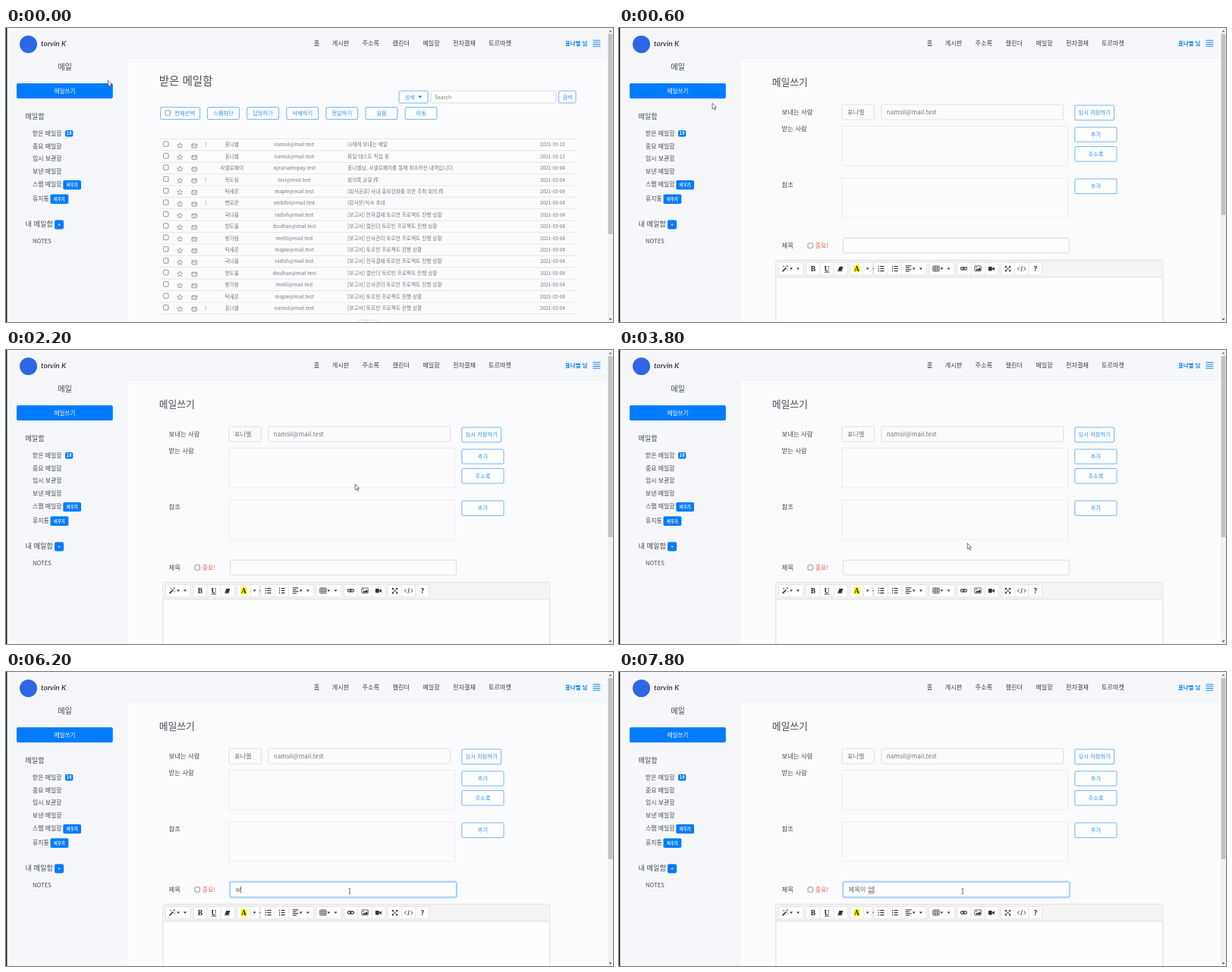
Recreate the animation shown at these times as an HTML page. Size 800x388 px, loop 8 s.

```html
<!DOCTYPE html>
<html lang="ko">
<head>
<meta charset="utf-8">
<style>
html, body { margin: 0; width: 100%; height: 100%; overflow: hidden; background: #fcfcfe; }
svg { display: block; width: 800px; height: 388px; }
text { font-family: "Noto Sans CJK KR", "Noto Sans CJK", "Noto Sans KR", "Noto Sans", sans-serif; white-space: pre; }
</style>
</head>
<body>
<svg id="stage" viewBox="0 0 800 388" xmlns="http://www.w3.org/2000/svg"></svg>
<script>
const BLUE = '#007bff', INK = '#45494f', SOFT = '#707479', TITLE = '#484b50', RED = '#ee5f57', PAGE = '#fcfcfe';
const EDGE = '#4f9ff4', LINK = '#2a8ffb';
const LOOP = 8000, STEP = 200, OPEN = 600, FOCUS = 5800;
const byId = id => document.getElementById(id);

function text(x, y, s, size, fill = INK, o = {}) {
  const { anchor = 'start', weight = 400, extra = '' } = o;
  return `<text x="${x}" y="${y}" font-size="${size}" fill="${fill}" text-anchor="${anchor}" font-weight="${weight}" ${extra}>${s}</text>`;
}
const mid = (x, y, s, size, fill, weight) => text(x, y, s, size, fill, { anchor: 'middle', weight });
// Rectangle given by its left, top, right and bottom edges
function box(l, t, r, b, fill = 'none', stroke = 'none', rx = 0, extra = '') {
  return `<rect x="${l}" y="${t}" width="${r - l}" height="${b - t}" fill="${fill}" stroke="${stroke}" stroke-width=".8" rx="${rx}" ${extra}/>`;
}
const path = (d, stroke, w = 0.8, fill = 'none') =>
  `<path d="${d}" stroke="${stroke}" stroke-width="${w}" fill="${fill}"/>`;
const shape = (d, fill = '#333') => path(d, 'none', 0, fill);
const button = (l, t, r, b, s, size = 7.2) =>
  box(l, t, r, b, '#fff', EDGE, 1.6) + mid((l + r) / 2, (t + b) / 2 + 2.6, s, size, LINK);
const check = (x, y) => box(x, y, x + 6.4, y + 6.4, '#fff', '#777', 1.2);
const badge = (l, t, r, b, s, size = 5.3) =>
  box(l, t, r, b, BLUE, 'none', 1.8) + mid((l + r) / 2, (t + b) / 2 + size * 0.36, s, size, '#fff', 700);
const caretDown = (x, y, w = 2) => shape(`M${x - w} ${y - w / 2}h${2 * w}l${-w} ${w * 1.15}z`);

function frame() {
  let s = box(0, 0, 800, 388, PAGE) + box(0, 0, 793, 41, '#f5f7fa') + box(0, 41, 160, 388, '#f5f7fa');
  s += box(0, 0, 1.4, 388, '#15171a');
  s += '<circle cx="29.5" cy="21.5" r="11.5" fill="#2f66e6"/>';
  s += text(46, 24.3, 'torvin K', 10, '#222', { weight: 500, extra: 'font-style="italic" style="font-family:Lato,sans-serif"' });

  const nav = [['홈', 409.5], ['게시판', 441], ['주소록', 480.7], ['캘린더', 520.7], ['메일함', 560.5], ['전자결재', 604], ['토르마켓', 651]];
  for (const [label, x] of nav) s += mid(x, 23, label, 8.1, '#3a3d42');
  s += text(737, 22.8, '표나별 님', 7.4, BLUE, { weight: 700 });
  for (let i = 0; i < 4; i++) s += path(`M773.5 ${16.3 + i * 2.6}h9.8`, BLUE, 0.9);

  s += mid(77.5, 55.3, '메일', 10.2, INK);
  s += box(14, 73, 140.8, 93, BLUE, 'none', 2, 'id="write"') + mid(77.5, 85.8, '메일쓰기', 7.5, '#fff');
  s += text(25.5, 120.3, '메일함', 9.1);
  [['받은 메일함', 142], ['중요 메일함', 158.5], ['임시 보관함', 175.2], ['보낸 메일함', 192], ['스팸 메일함', 209.4], ['휴지통', 228]]
    .forEach(([label, y]) => s += text(35, y, label, 7.9));
  s += badge(78, 135, 88.3, 143.6, '18', 6) + badge(75.3, 201, 99, 213.3, '비우기') + badge(58.5, 219.5, 82.3, 232, '비우기');
  s += text(25.5, 262, '내 메일함', 9.2) + badge(64, 253.6, 76, 265.4, '+', 6);
  s += text(35, 284, 'NOTES', 7.7);

  s += box(793, 0, 800, 388, '#f1f1f1') + box(793.7, 8, 799.4, 272, '#c1c1c1', 'none', 0, 'id="thumb"');
  s += shape('M794.6 5.2h4l-2-2.4z', '#777') + shape('M794.6 383.4h4l-2 2.4z', '#444');
  return s;
}

function inbox() {
  let s = text(201.7, 75.3, '받은 메일함', 14.5, TITLE, { weight: 300 });
  s += box(518, 83, 556, 99, '#fff', EDGE, 1.6) + text(526, 93.6, '상세', 7.2, LINK);
  s += shape('M543.3 89.6h5l-2.5 3z', BLUE);
  s += box(560, 83, 725, 99, '#fff', '#ced4da', 1.8) + text(564.8, 93.5, 'Search', 7, '#777');
  s += button(728.6, 83, 751, 99, '검색');
  s += box(203.6, 104.6, 255.6, 120.6, '#fff', EDGE, 1.6) + check(210, 108.8) + text(222, 115.2, '전체선택', 7.4, LINK);
  ['스팸차단', '답장하기', '삭제하기', '전달하기', '읽음', '이동'].forEach((label, i) =>
    s += button(265.6 + i * 52.1, 104.6, 307.4 + i * 52.1, 120.6, label, 7.3));

  const me = ['표나별', 'namsil@mail.test'], shop = ['사엘로페이', 'xyz@saelopay.test'], ok = ['옥도림', 'tovi@mail.test'];
  const tak = ['탁새온', 'maple@mail.test'], byun = ['변로운', 'webdol@mail.test'], kuk = ['국나울', 'radish@mail.test'];
  const bang = ['방도울', 'doulhan@mail.test'], bong = ['봉가람', 'mellll@mail.test'];
  const report = topic => `[보고서] ${topic}토르빈 프로젝트 진행 상황`;
  const rows = [
    [me, '나에게 보내는 메일'], [me, '파일 테스트 작업 중'],
    [shop, '표나별님, 사엘로페이를 통해 취소하신 내역입니다.'],
    [ok, '회의록 공유 件'], [tak, '[회식공유] 사내 홍보강화를 위한 주최 회의 件'], [byun, '(감사문)식사 초대'],
    [kuk, report('전자결재 ')], [bang, report('캘린더 ')], [bong, report('인사관리 ')], [tak, report('')],
    [kuk, report('전자결재 ')], [bang, report('캘린더 ')], [bong, report('인사관리 ')], [tak, report('')], [me, report('')]
  ];
  rows.forEach(([[name, mail], title], i) => {
    const y = 154 + i * 15.4, base = y + 2.4;
    s += path(`M202 ${y - 7.6}H752`, '#dfe2e6', 0.8);
    s += check(207.6, y - 4) + star(229, y + 1.3);
    s += box(245, y - 1, 251.4, y + 4, 'none', '#777', 0.6) + path(`M245 ${y - 0.6}l3.2 2.6l3.2 -2.6`, '#777', 0.7);
    if ([0, 3, 5, 14].includes(i)) s += mid(263.3, base + 0.5, '!', 7.6, RED, 500);
    s += mid(297.7, base, name, 6.75, SOFT) + mid(380, base, mail, 6.43, SOFT);
    s += text(450, base, title, 6.7, SOFT) + mid(720.4, base, i < 2 ? '2021-03-13' : '2021-03-04', 6.43, SOFT);
  });
  s += path('M202 377.4H752', '#dfe2e6', 0.8);
  return s + box(464, 385.5, 489, 400, '#fff', '#d5d9de', 1.5) + path('M476.5 385.5V388', '#d5d9de');
}

function star(cx, cy) {
  let d = '';
  for (let i = 0; i < 10; i++) {
    const a = i * Math.PI / 5, r = i % 2 ? 1.7 : 3.7;
    d += (i ? 'L' : 'M') + (cx + r * Math.sin(a)).toFixed(2) + ' ' + (cy - r * Math.cos(a)).toFixed(2);
  }
  return path(d + 'z', '#777', 0.65);
}

function compose() {
  let s = text(201.8, 75.8, '메일쓰기', 12.8, TITLE, { weight: 300 });
  [['보내는 사람', 114], ['받는 사람', 135.8], ['참조', 209.6], ['제목', 290]].forEach(([label, y]) => s += text(214.6, y, label, 8.4));
  s += box(293.8, 101, 336.4, 121, PAGE, '#d5d9de', 1.8) + text(301, 114.2, '표나별', 8.2, SOFT);
  s += box(345.8, 101, 585.6, 121, PAGE, '#d5d9de', 1.8) + text(352.8, 114.2, 'namsil@mail.test', 8.1, SOFT);
  s += box(293.8, 129.6, 591.4, 181.8, PAGE, '#e6e8eb') + box(293.8, 198, 591.4, 250, PAGE, '#e6e8eb');
  s += button(600.8, 102, 652.6, 121.6, '임시 저장하기', 7.3) + button(600.8, 131, 656, 150.2, '추가');
  s += button(600.8, 156.5, 656, 176, '주소록') + button(600.8, 199, 656, 218.6, '추가');
  s += check(249, 283.9) + text(258.8, 290, '중요!', 7.9, RED);
  s += box(294.8, 276.4, 594.2, 297.7, 'none', 'none', 2.6, 'id="ring" style="stroke:#bfdcfb;stroke-width:2"');
  s += box(295.6, 277.2, 593.4, 296.9, '#fdfdff', '#d0d4d9', 1.8, 'id="field"');
  s += text(302.6, 290.2, '', 8.3, '#62676d', { extra: 'id="typed"' });
  s += '<path id="mark" stroke="#666" stroke-width=".7"/><path id="bar" stroke="#444" stroke-width=".7"/>';
  return s + editor() + `<g id="hints">${hints()}</g>`;
}

// Dropdown of earlier entries under the subject field
function hints() {
  let s = box(294.6, 298.6, 395.6, 344.4, '#fff', '#d0d0d0');
  ['제목', '제목 없음'].forEach((label, i) => s += text(302.6, 313.6 + i * 20, label, 7.6, INK));
  return s;
}

function editor() {
  let s = box(206.8, 306.4, 716.8, 400, '#fefeff', '#cfd2d6', 1.5) + box(207.2, 306.8, 716.4, 329, '#f4f4f5');
  s += path('M207 329H716.6', '#d4d6d9', 0.8);
  const groups = [[210.5, 243], [246.6, 301.4, 265, 283], [304.6, 333.8, 322.2], [335.8, 405.2, 354, 372.4],
    [408.8, 442], [445.6, 500, 463.8, 482], [503.4, 557.6, 521.6, 539.8]];
  for (const [l, r, ...cuts] of groups) {
    s += box(l, 309.4, r, 326, '#fff', '#dcdee1', 1.2);
    for (const x of cuts) s += path(`M${x} 309.4V326`, '#dcdee1');
  }
  // wand
  s += path('M215.4 321.4l5 -5', '#333', 1.5) + path('M221.8 313v2.6M220.5 314.3h2.6M217 313.8v1.8M216.1 314.7h1.8M222.4 318v1.6', '#333', 0.6);
  for (const x of [227, 236, 327.6, 388.6, 397.8, 425.4, 434.4]) s += caretDown(x, 317.6);
  const serif = 'style="font-family:\'Liberation Serif\',serif"';
  const glyph = (x, c) => text(x, 320.9, c, 9.4, '#222', { anchor: 'middle', weight: 700, extra: serif });
  s += glyph(255.8, 'B') + glyph(274, 'U') + path('M270.7 322.2h6.6', '#222', 0.8);
  s += shape('M290.4 315h5l-2 5.4h-5z') + path('M288.2 320.8h6', '#333', 0.8);
  s += box(309.4, 313, 317.6, 322.4, '#ffff00') + glyph(313.5, 'A');
  s += path('M334.4 317.6h1.2', '#333', 1);
  // lists and alignment
  for (let i = 0; i < 3; i++) {
    const y = 314.6 + i * 3;
    s += path(`M341.4 ${y}h1.5M344.2 ${y}h5.2`, '#333', 1.4) + path(`M362.6 ${y}h5`, '#333', 1.2) + path(`M360 ${y}h1`, '#333', 1.7);
  }
  for (let i = 0; i < 4; i++) s += path(`M377.8 ${313.9 + i * 2.4}h${i % 2 ? 5 : 7.6}`, '#333', 1.1);
  // table
  s += box(413.8, 314, 422, 321, '#fff', '#333', 0.6) + path('M413.8 316.3h8.2M413.8 318.7h8.2M416.5 314v7M419.3 314v7', '#333', 0.7);
  // link, picture, video
  const link = l => box(l, 315.9, l + 4.8, 319.1, 'none', '#333', 1.6, 'style="stroke-width:1.1"');
  s += link(450.2) + link(453.6);
  s += box(468.8, 314, 477.2, 321, '#fff', '#333', 0.7) + shape('M469.8 320l2 -2.4l1.2 1.1l2 -2.6l1.6 2.2v1.7z') + '<circle cx="471" cy="316" r=".8" fill="#333"/>';
  s += box(486.8, 315, 491.8, 320.4, '#333', 'none', 0.8) + shape('M492 317.2l2.8 -2v5l-2.8 -2z');
  // fullscreen, code, help
  s += path('M509.6 314.8l5.8 5.8M515.4 314.8l-5.8 5.8', '#333', 0.9);
  s += shape('M508.8 314h2.8l-2.8 2.8zM516.2 314v2.8l-2.8 -2.8zM508.8 321.4v-2.8l2.8 2.8zM516.2 321.4h-2.8l2.8 -2.8z');
  s += path('M527.6 315.4l-2.4 2.3l2.4 2.3M533.6 315.4l2.4 2.3l-2.4 2.3M531.4 314.2l-1.6 7', '#333', 0.9);
  return s + mid(548.8, 321, '?', 9, '#222', 700);
}

byId('stage').innerHTML = frame() + `<g id="inbox">${inbox()}</g><g id="compose">${compose()}</g>` +
  '<path id="arrow" d="M0 0V7.7L1.8 6.1L3.1 9L4.4 8.4L3.1 5.6H5.4z" fill="#fff" stroke="#333" stroke-width=".65"/>' +
  '<path id="beam" d="M-1.2 -3.2H1.2M-1.2 3.2H1.2M0 -3.2V3.2" fill="none" stroke="#333" stroke-width=".7"/>';

// Pointer path: time, x, y
const route = [
  [0, 134.5, 69.3], [200, 127, 82], [400, 125, 86], [600, 123, 99.3], [800, 300, 108], [1000, 520, 104],
  [1200, 647, 102.5], [1400, 622, 113], [2000, 500, 163], [2200, 460.2, 177], [2400, 384, 250],
  [2600, 391, 263], [2800, 388, 273], [3400, 367, 279], [3600, 367, 279], [3800, 459.2, 255],
  [4400, 440, 278], [4800, 440, 278], [5000, 441.2, 276], [5400, 450, 158.5], [5600, 450, 158.5],
  [FOCUS, 453, 285.6], [LOOP, 453, 285.6]
];
const keys = [[0, ''], [6200, 'w'], [6600, ''], [6800, '제'], [7000, '제모'], [7200, '제목이'], [7400, '제목이 '], [7600, '제목이 업'], [7800, '제목이 없']];

function pointer(t) {
  const i = Math.max(1, route.findIndex(p => p[0] >= t));
  const [t0, x0, y0] = route[i - 1], [t1, x1, y1] = route[i];
  const k = (t - t0) / (t1 - t0);
  return [x0 + (x1 - x0) * k, y0 + (y1 - y0) * k];
}
const show = (id, on) => byId(id).style.display = on ? '' : 'none';

function draw(now) {
  const t = Math.floor(now % LOOP / STEP) * STEP;
  const writing = t >= OPEN, focus = t >= FOCUS, pressed = t > 0 && !writing;
  show('inbox', !writing);
  show('compose', writing);
  byId('thumb').setAttribute('height', writing ? 239 : 264);
  byId('write').setAttribute('fill', pressed ? '#0069d9' : BLUE);
  byId('write').setAttribute('stroke', pressed ? '#80bdff' : 'none');
  byId('field').setAttribute('stroke', focus ? '#85bdf8' : '#d0d4d9');

  const [x, y] = pointer(t);
  const inField = writing && y >= 277.5 && x > 295 && x < 594;
  byId('arrow').setAttribute('transform', `translate(${x} ${y})`);
  byId('beam').setAttribute('transform', `translate(${x} ${y + 3.6})`);

  const word = keys.filter(k => k[0] <= t).pop()[1];
  const typed = byId('typed');
  typed.textContent = word;
  const end = 302.9 + (writing && word ? typed.getComputedTextLength() : 0);
  byId('bar').setAttribute('d', `M${end} 282.6V291.8`);
  byId('mark').setAttribute('d', `M${end - 7.6} 292.2H${end}`);
  show('arrow', !inField);
  show('beam', inField);
  show('ring', focus);
  show('bar', focus);
  show('mark', t >= 6800 && !word.endsWith(' '));
  show('hints', t >= 6800 && t < 7200);
}

const start = performance.now();
function tick() {
  draw(performance.now() - start);
  requestAnimationFrame(tick);
}
tick();
</script>
</body>
</html>
```
